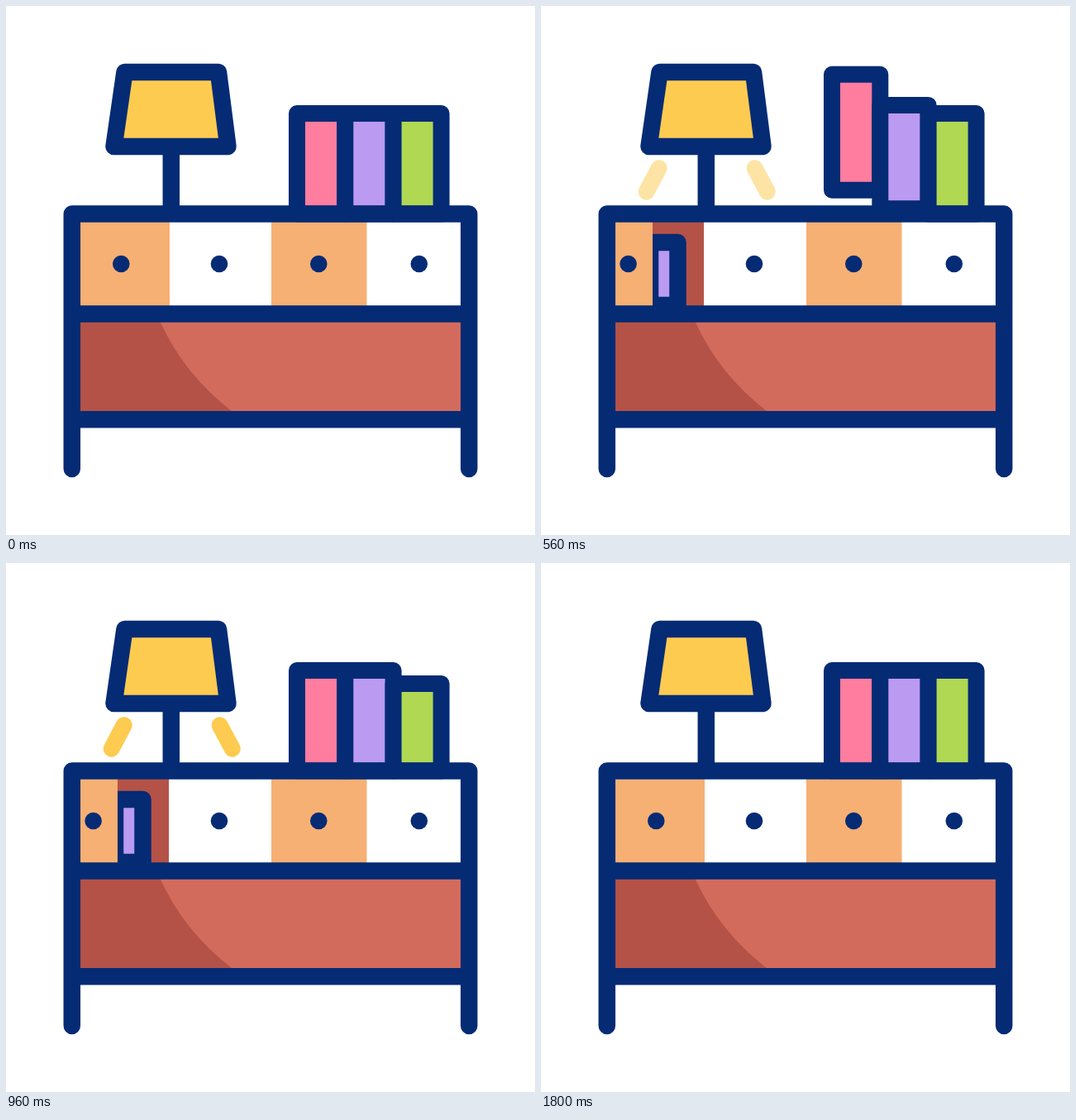
An HTML page without scripts for the animation above (2000 ms loop, 640 px wide and 640 px high).

```html
<!DOCTYPE html>
<html lang="en">
<head>
<meta charset="utf-8">
<title>Sideboard</title>
<style>
  html, body { margin: 0; width: 100%; height: 100%; overflow: hidden; background: #fff; }
  svg { display: block; width: 100%; height: 100%; }

  .line { stroke: #052b75; stroke-width: 20.5; stroke-linejoin: round; }
  .knob { fill: #052b75; }
  .wood { fill: #f6b074; }
  .shade-dark { fill: #b55247; }

  .book, .shade, .light, .door, .door-knob {
    animation: 2s cubic-bezier(.33, 0, .67, 1) infinite;
  }
  .book { stroke-width: 20; animation-name: hop; animation-delay: var(--wait, 0s); }
  .shade { animation-name: stretch; }
  .light { animation-name: glow; opacity: 0; stroke: #fdcb50; stroke-width: 20; stroke-linecap: round; }
  .door { animation-name: slide; }
  .door-knob { animation-name: slide-knob; }

  @keyframes hop {
    0%, 21.1% { y: 130px; height: 121.5px; }
    33.6% { y: 49px; height: 153px; }
    39.1% { y: 150px; height: 101.5px; }
    43.8%, 100% { y: 130px; height: 121.5px; }
  }
  @keyframes stretch {
    0%, 5.25% { d: path("M143.5 80H257L268.5 170H130.5Z"); }
    19.4% { d: path("M154 54.5H242.5L260.5 157H142.5Z"); }
    24% { d: path("M141.5 85H259L270 172H129Z"); }
    28%, 100% { d: path("M143.5 80H257L268.5 170H130.5Z"); }
  }
  @keyframes glow {
    0%, 25% { opacity: 0; }
    31%, 65.25% { opacity: 1; }
    86.5%, 100% { opacity: 0; }
  }
  @keyframes slide {
    0%, 5.25% { width: 108px; }
    19.4%, 65.25% { width: 45px; }
    85.75%, 100% { width: 108px; }
  }
  @keyframes slide-knob {
    0%, 5.25% { cx: 139.3px; }
    19.4%, 65.25% { cx: 105.6px; }
    85.75%, 100% { cx: 139.3px; }
  }
</style>
</head>
<body>
<svg viewBox="0 0 640 640">
  <!-- lamp -->
  <path class="light" d="M142.7 196.2 127.7 224.7M258.6 196.2 273.8 224.7"/>
  <path class="line" d="M199.8 163V250"/>
  <path class="line shade" fill="#fdcb50" d="M143.5 80H257L268.5 170H130.5Z"/>

  <!-- open compartment -->
  <rect class="shade-dark" x="90" y="260" width="107" height="104"/>
  <rect class="line" fill="#bb9af2" x="132" y="286" width="33.5" height="76"/>
  <rect class="wood door" x="90" y="260" width="108" height="104"/>
  <rect class="wood" x="321" y="260" width="115.5" height="104"/>
  <circle class="knob door-knob" cx="139.3" cy="312" r="10.3"/>
  <g class="knob">
    <circle cx="258" cy="312" r="10.3"/>
    <circle cx="378.3" cy="312" r="10.3"/>
    <circle cx="499.8" cy="312" r="10.3"/>
  </g>

  <!-- lower panel -->
  <rect fill="#d36b5c" x="88" y="380" width="464" height="112"/>
  <path class="shade-dark" d="M88 380H186L187 383Q216 446 273 490V492H88Z"/>

  <!-- books -->
  <g class="line">
    <rect class="book" fill="#ff7d9f" x="352" y="130" width="58.3" height="121.5"/>
    <rect class="book" style="--wait: 84ms" fill="#bb9af2" x="410.3" y="130" width="58.3" height="121.5"/>
    <rect class="book" style="--wait: 152ms" fill="#b0d853" x="468.6" y="130" width="58" height="121.5"/>
  </g>

  <!-- frame -->
  <path class="line" fill="none" stroke-linecap="round"
        d="M79.8 560V251.5H560.2V560M80 372.5H560M80 500.3H560"/>
</svg>
</body>
</html>
```
